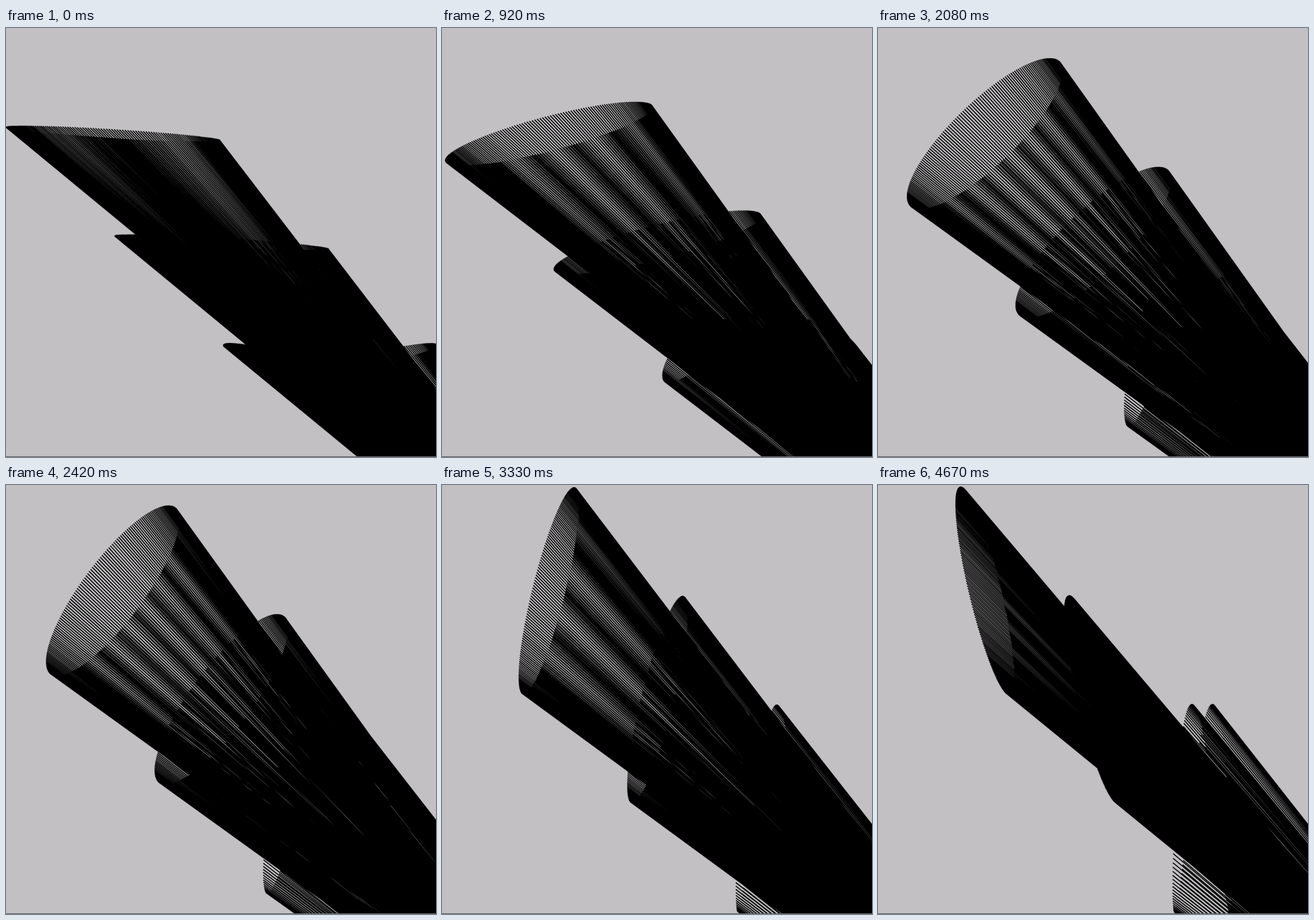
Recreate the animation shown at these times as an HTML page with a canvas. Size 600 px wide and 598 px high, loop 4760 ms.

```html
<!DOCTYPE html>
<html lang="en">
<head>
<meta charset="utf-8">
<title>Ruled cones</title>
<style>
html, body { margin: 0; height: 100%; overflow: hidden; background: #c2c0c2; }
canvas { display: block; }
</style>
</head>
<body>
<canvas id="stage" width="600" height="598"></canvas>
<script>
const ctx = document.getElementById('stage').getContext('2d');
const LOOP = 4760, FPS = 12, LAST = 56;
const LINES = 250, RADIUS = 150, SHIFT = 151.5;
const CENTER = { x: 149, y: 147.3 };
const APEX = { x: 623, y: 627 };
const rad = deg => deg * Math.PI / 180;

// Each cone joins a Lissajous curve to its own distant apex.
const cones = [
  { freq: 1, phase: rad(34) },
  { freq: 1, phase: rad(34) },
  { freq: 2, phase: rad(139) }
];

function addCone({ freq, phase }, index, ampX, ampY) {
  const cx = CENTER.x + index * SHIFT;
  const cy = CENTER.y + index * SHIFT;
  for (let i = 0; i < LINES; i++) {
    const u = i / LINES * Math.PI * 2;
    ctx.moveTo(cx + ampX * Math.cos(u), cy - ampY * Math.cos(freq * u + phase));
    ctx.lineTo(cx + APEX.x, cy + APEX.y);
  }
}

function draw(step) {
  const ampX = RADIUS * Math.cos(rad(2.01 * step - 6.7));
  const ampY = RADIUS * Math.sin(rad(1.95 * step - 4.2));
  ctx.fillStyle = '#c2c0c2';
  ctx.fillRect(0, 0, 600, 598);
  ctx.strokeStyle = '#000';
  ctx.lineWidth = 1.4;
  ctx.beginPath();
  cones.forEach((cone, i) => addCone(cone, i, ampX, ampY));
  ctx.stroke();
  ctx.fillStyle = '#666';
  ctx.fillRect(0, 597, 600, 1);
}

const start = performance.now();
let shown = -1;
function tick() {
  const t = (performance.now() - start) % LOOP;
  const step = Math.min(LAST, Math.floor((t + 5) * FPS / 1000));
  if (step !== shown) draw(shown = step);
  requestAnimationFrame(tick);
}
tick();
</script>
</body>
</html>
```
